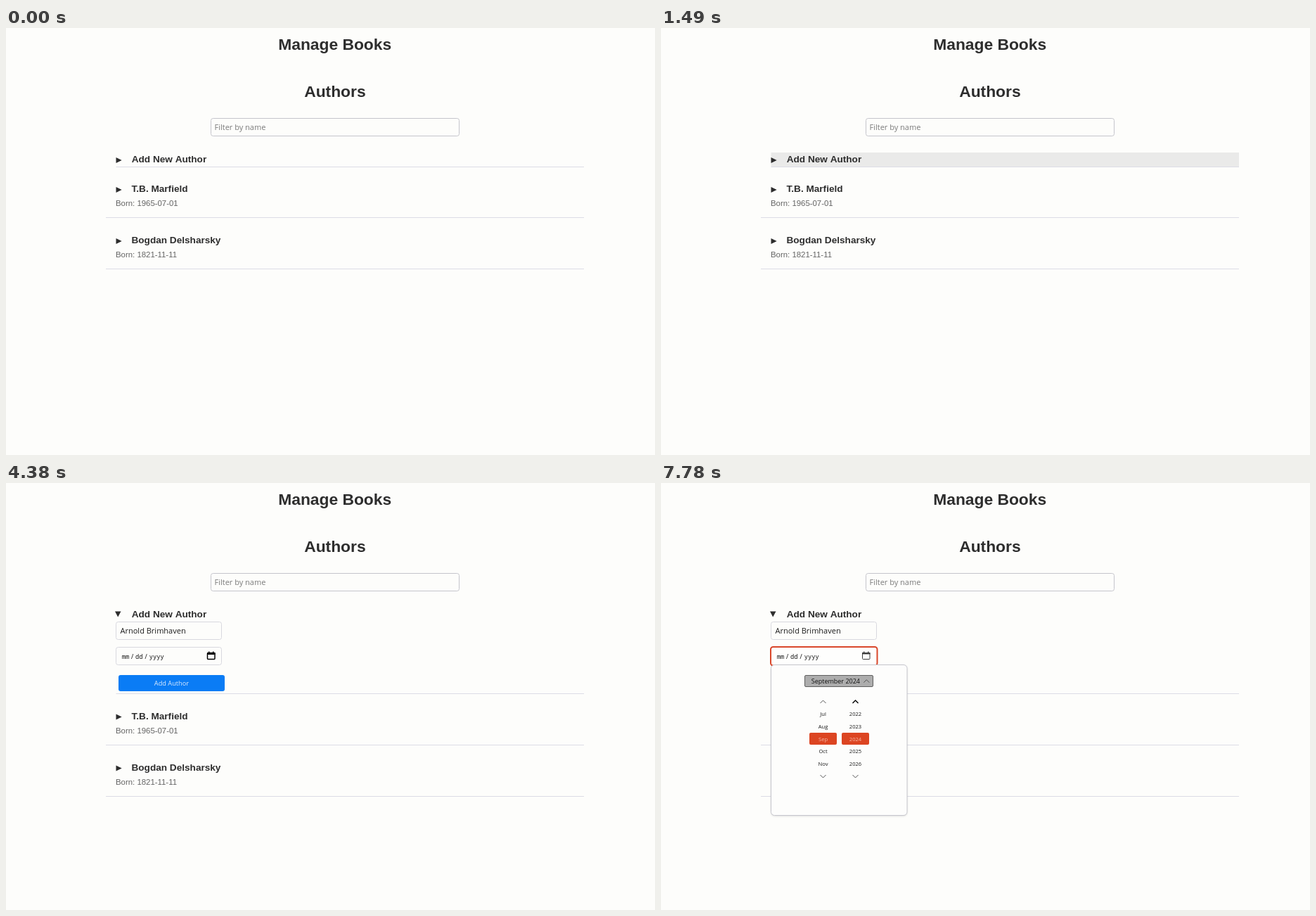
An HTML page with a canvas for the animation above (8000 ms loop, 923 px wide and 607 px high).

```html
<!DOCTYPE html>
<html lang="en">
<head>
<meta charset="utf-8">
<title>Manage Books</title>
<style>
  html, body { margin: 0; width: 100%; height: 100%; overflow: hidden; background: #fdfdfb; }
  canvas { display: block; }
</style>
</head>
<body>
<canvas id="stage" width="923" height="607"></canvas>
<script>
const ctx = document.getElementById('stage').getContext('2d');
const LOOP = 8000;
const ARIAL = '"Liberation Sans", Arial, sans-serif';
const UI = '"Open Sans", "Noto Sans", sans-serif';
const MONO = '"Noto Sans Mono", monospace';
const PAGE = '#fdfdfb', INK = '#2d2d2d', RED = '#d9472b', HOVER = '#eaeae9';

// Moments (ms) at which the pointer does something.
const T = {
  lowerRow: 440, upperRow: 550, leaveRow: 970, header: 1270, open: 2080, opened: 2490,
  leaveHeader: 2830, iconHover: 4380, focus: 4560, popup: 4760, iconLeave: 6030,
  monthHover: 6630, monthPress: 7270, picker: 7310, arrowHover: 7490, arrowDark: 7780
};

const AUTHORS = [
  { name: 'T.B. Marfield', born: '1965-07-01', y: 233 },
  { name: 'Bogdan Delsharsky', born: '1821-11-11', y: 306 }
];

function text(str, x, y, size, color, { font = UI, weight = 400, align = 'left' } = {}) {
  ctx.font = `${weight} ${size}px ${font}`;
  ctx.fillStyle = color;
  ctx.textAlign = align;
  ctx.fillText(str, x, y);
}

function centered(str, x, y, size, color, options = {}) {
  text(str, x, y, size, color, { ...options, align: 'center' });
}

function box(x, y, w, h, radius, fill, stroke, lineWidth = 1) {
  ctx.beginPath();
  ctx.roundRect(x, y, w, h, radius);
  if (fill) {
    ctx.fillStyle = fill;
    ctx.fill();
  }
  if (stroke) {
    ctx.strokeStyle = stroke;
    ctx.lineWidth = lineWidth;
    ctx.stroke();
  }
}

function rect(x, y, w, h, color) {
  ctx.fillStyle = color;
  ctx.fillRect(x, y, w, h);
}

function path(points, color, width) {
  ctx.beginPath();
  points.forEach(([x, y]) => ctx.lineTo(x, y));
  if (width) {
    ctx.strokeStyle = color;
    ctx.lineWidth = width;
    ctx.stroke();
  } else {
    ctx.fillStyle = color;
    ctx.fill();
  }
}

function marker(baseline, open) {
  const y = baseline - 3;
  path(open
    ? [[155, y - 5.5], [163.5, y - 5.5], [159.2, y + 2.5]]
    : [[156.5, y - 4], [164.7, y], [156.5, y + 4]], INK);
}

// Vertical chevrons point down for dir = 1, up for dir = -1.
function chevron(x, y, dir, color = '#555', width = 1) {
  path([[x - 4, y - 2 * dir], [x, y + 2 * dir], [x + 4, y - 2 * dir]], color, width);
}

function sideChevron(x, dir) {
  path([[x - 2 * dir, 277.5], [x + 2 * dir, 281.7], [x - 2 * dir, 286]], '#555', 1);
}

function opening(t) {
  if (t < T.open) return 0;
  const p = Math.min(1, (t - T.open + 35) / (T.opened - T.open + 35));
  return p * p * (3 - 2 * p);
}

function drawHeading() {
  const bold = { font: ARIAL, weight: 700 };
  centered('Manage Books', 467.7, 31, 22.8, INK, bold);
  centered('Authors', 467.9, 98, 22.8, INK, bold);
  box(291.5, 128.5, 353, 25, 3, null, '#c5c5cc');
  text('Filter by name', 296.5, 145, 11, '#7b7b7b');
}

function drawAuthor({ name, born, y }, shift, hovered) {
  if (hovered) rect(150.5, y - 22 + shift, 678, 52, HOVER);
  marker(y + shift, false);
  text(name, 178.5, y + shift, 13.6, INK, { font: ARIAL, weight: 700 });
  text('Born: ' + born, 156, y + 20 + shift, 11.4, '#646464', { font: ARIAL });
  rect(142, Math.round(y + 36.4 + shift), 680, 1, '#dcdce6');
}

function drawCalendarIcon(active) {
  const color = active ? '#000' : '#3c3c3c';
  box(286.5, 241.5, 10.5, 9, 1, null, color, active ? 1.5 : 1);
  rect(286, 241, 11.5, active ? 3 : 2.4, color);
  rect(288, 239.5, 1.4, 2, color);
  rect(294, 239.5, 1.4, 2, color);
}

function drawForm(t) {
  box(156.5, 197.5, 150, 25, 3, null, '#d8d8df');
  text('Arnold Brimhaven', 162.5, 213.7, 11, '#1c1c1c');

  if (t >= T.focus) box(156, 233, 151.5, 26.5, 3.5, '#fefefd', RED, 2);
  else box(156.5, 233.5, 150, 25, 3, null, '#d8d8df');
  [['mm', 164.7], ['/', 177], ['dd', 184], ['/', 196.5], ['yyyy', 203.8]]
    .forEach(([part, x]) => text(part, x, 249.5, 8.7, '#111', { font: MONO }));
  drawCalendarIcon(t >= T.iconHover && t < T.iconLeave);

  box(160, 273, 151, 23, 3, '#0a7cf5');
  centered('Add Author', 235.4, 288, 9.2, '#dcebfd');
}

function drawList(t) {
  const open = opening(t);
  const shift = 102.6 * open;
  const bottom = Math.round(196.6 + shift);

  if (t >= T.header && t < T.leaveHeader) rect(156.5, 177, 665.5, 20, HOVER);
  marker(191, open > 0);
  text('Add New Author', 178.7, 191, 13.6, INK, { font: ARIAL, weight: 700 });

  if (open > 0) {
    ctx.save();
    ctx.beginPath();
    ctx.rect(140, 196, 690, bottom - 196);
    ctx.clip();
    drawForm(t);
    ctx.restore();
  }
  rect(156.5, bottom, 665.5, 1, '#dcdce6');

  const hovered = t < T.lowerRow || t >= T.leaveRow ? -1 : t < T.upperRow ? 1 : 0;
  AUTHORS.forEach((author, i) => drawAuthor(author, shift, i === hovered));
}

function drawMonthButton(t) {
  const picking = t >= T.picker;
  const fill = t >= T.monthPress ? '#adadad' : t >= T.monthHover ? '#c9c9c9' : '#dfdfdf';
  box(204.5, 273.5, 97, 16, 1.5, fill, '#606060');
  text('September 2024', 213.7, 284.5, 9, '#111');
  chevron(292.3, 281.7, picking ? -1 : 1);
}

function drawDays() {
  const columnX = i => 183 + 23.42 * i;
  const weekend = i => i % 7 === 0 || i % 7 === 6;

  sideChevron(180, -1);
  sideChevron(326.3, 1);
  ['Sun', 'Mon', 'Tue', 'Wed', 'Thu', 'Fri', 'Sat'].forEach((day, i) =>
    centered(day, columnX(i), 308.5, 7.2, weekend(i) ? '#e58d90' : '#929292'));

  box(265, 335, 24.3, 20.5, 3.5, '#fdfdfd', RED, 1.8);
  box(267, 337, 20.3, 16.5, 1.5, '#adadad');

  // The grid starts on 25 August; September has 30 days.
  for (let i = 0; i < 42; i++) {
    const day = i - 6;
    const outside = day < 1 || day > 30;
    const label = day < 1 ? day + 31 : day > 30 ? day - 30 : day;
    const color = weekend(i) ? (outside ? '#e9999c' : '#c8232b') : (outside ? '#929292' : '#1c1c1c');
    centered(label, columnX(i % 7), 328.2 + 19.8 * Math.floor(i / 7), 7.6, color,
      { weight: day === 5 ? 700 : 400 });
  }

  box(171.5, 440.5, 39, 16, 1.5, '#e2e2e2', '#606060');
  centered('Clear', 191, 452, 9, '#111');
}

function drawPickerColumn(x, labels, upColor, upWidth) {
  chevron(x, 311, -1, upColor, upWidth);
  chevron(x, 417, 1);
  box(x - 19.5, 355, 39, 17, 2, '#dc4522');
  labels.forEach((label, i) =>
    centered(label, x, 331.2 + 17.7 * i, 7.6, i === 2 ? '#f7b9a9' : '#1c1c1c'));
}

function drawPopup(t) {
  ctx.save();
  ctx.shadowColor = 'rgba(0, 0, 0, 0.15)';
  ctx.shadowBlur = 3;
  ctx.shadowOffsetY = 1;
  box(156.5, 258.5, 193.5, 214, 5, '#fdfdfc');
  ctx.restore();
  box(156.5, 258.5, 193.5, 214, 5, '#fdfdfc', '#c6c6cd');
  drawMonthButton(t);

  if (t < T.picker) return drawDays();
  drawPickerColumn(230.5, ['Jul', 'Aug', 'Sep', 'Oct', 'Nov'], '#555', 1);
  const dark = t >= T.arrowDark, hover = t >= T.arrowHover;
  drawPickerColumn(276.5, [2022, 2023, 2024, 2025, 2026],
    dark ? '#000' : hover ? '#222' : '#555', dark ? 1.4 : hover ? 1.2 : 1);
}

function render(t) {
  rect(0, 0, 923, 607, PAGE);
  drawHeading();
  drawList(t);
  if (t >= T.popup) drawPopup(t);
}

const start = performance.now();
function tick() {
  render((performance.now() - start) % LOOP);
  requestAnimationFrame(tick);
}
tick();
</script>
</body>
</html>
```
